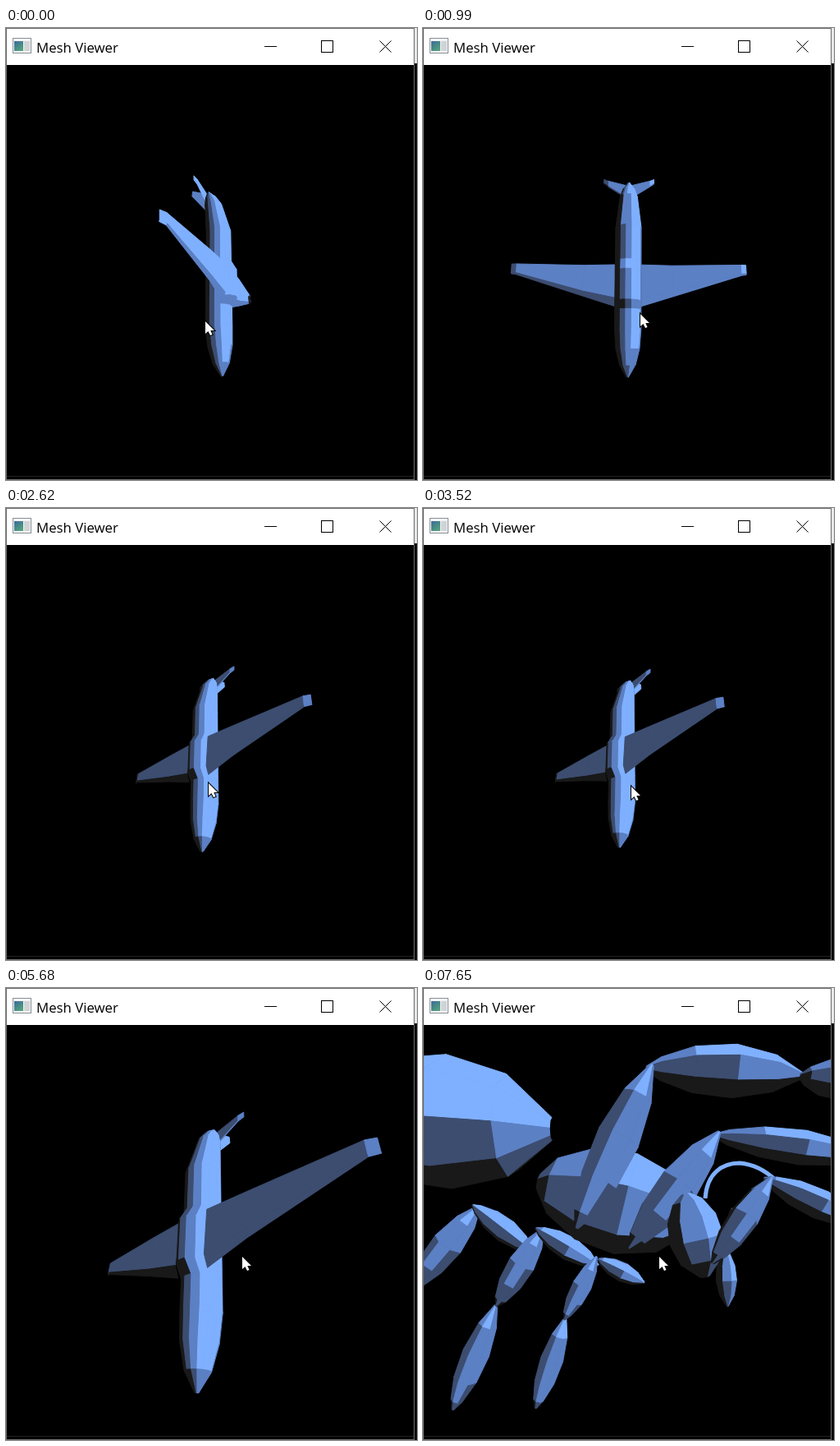
Recreate the animation shown at these times as an HTML page with a canvas. Size 501 px wide and 550 px high, loop 8 s.

```html
<!DOCTYPE html>
<html lang="en">
<head>
<meta charset="utf-8">
<title>Mesh Viewer</title>
<style>
html, body { margin: 0; width: 100%; height: 100%; overflow: hidden; background: #000; }
canvas { display: block; }
</style>
</head>
<body>
<canvas id="stage" width="501" height="550"></canvas>
<script>
const ctx = document.getElementById('stage').getContext('2d');
const LOOP = 8000, ANT_START = 7650, REDRAW = 124.6;
const FOCAL = 433, DISTANCE = 700, CX = 249, CY = 295;
const LIGHT = unit([1, -1, -1]);

// time, nose direction, right wing direction
const POSES = [
  [0, .055, .92, -.38, .367, .277, .888],
  [480, .01, .875, -.48, .975, -.137, -.17],
  [720, 0, .99, -.1, .97, -.1, .2],
  [870, 0, .99, -.12, .97, -.1, .15],
  [1590, -.046, .857, -.513, .725, -.31, -.618]];

// time, extra camera distance
const ZOOM = [[3400, 0], [3520, 35], [3640, 340], [3760, 340], [4440, 1230], [4600, 1365],
  [4870, 1365], [5020, 1020], [5530, 100], [5680, -148], [5830, -365], [5980, -433]];

// time, x, y
const MOUSE = [[0, 243, 357], [480, 254, 355], [1590, 278, 341], [2240, 278, 341], [2480, 250, 335],
  [2620, 247, 335], [3000, 253, 338], [3520, 254, 339], [4010, 254, 339],
  [4160, 254, 361], [4600, 255, 378], [4870, 263, 379], [5170, 288, 327]];

function sample(keys, t) {
  const i = keys.findIndex(k => k[0] > t);
  if (i < 0) return keys[keys.length - 1].slice(1);
  if (i === 0) return keys[0].slice(1);
  const a = keys[i - 1], b = keys[i], u = (t - a[0]) / (b[0] - a[0]);
  return a.slice(1).map((v, j) => v + (b[j + 1] - v) * u);
}

function dot(a, b) { return a[0] * b[0] + a[1] * b[1] + a[2] * b[2]; }
function sub(a, b) { return a.map((v, i) => v - b[i]); }
function unit(a) { return a.map(v => v / Math.hypot(...a)); }
function cross(a, b) {
  return [a[1] * b[2] - a[2] * b[1], a[2] * b[0] - a[0] * b[2], a[0] * b[1] - a[1] * b[0]];
}

// Model coordinates are forward, right, belly.
function lathe(rings, sides) {
  const points = rings.map(([a, r, offset = 0, bulge = 0]) => Array.from({ length: sides }, (_, k) => {
    const angle = k * 2 * Math.PI / sides, s = Math.sin(angle);
    return [a, r * Math.cos(angle), offset + r * s + bulge * Math.max(0, s)];
  }));
  const faces = [];
  for (let i = 1; i < rings.length; i++)
    for (let k = 0; k < sides; k++) {
      const j = (k + 1) % sides;
      faces.push([points[i - 1][k], points[i - 1][j], points[i][j], points[i][k]]);
    }
  return faces;
}

// Sections: span, trailing edge, leading edge, belly height, width of the rounded lip
function surface(sections) {
  const edges = sections.map(([s, trail, lead, n, lip]) =>
    [[trail, s, n], [lead - lip, s, n], [lead, s, n - lip * .45]]);
  return edges.slice(1).flatMap((outer, i) => [0, 1].map(j =>
    [edges[i][j], edges[i][j + 1], outer[j + 1], outer[j]]));
}

function fuselageRing(a) {
  const end = a < 0 ? Math.max(0, -80 - a) / 101 : Math.max(0, a - 115) / 86;
  const radius = 2 + 23 * (1 - end * end) ** .7;
  const offset = 25 - (a < -80 ? 16 * end * end : .065 * (Math.min(a, 115) + 80));
  return [a, radius, offset, a > 0 && a < 70 ? 11 : 0];
}

const mirror = faces => faces.map(f => f.map(([a, s, n]) => [a, -s, n]));
const FUSELAGE = lathe([-181, -165, -147, -80, -14, 6, 62, 78, 115, 150, 180, 201].map(fuselageRing), 14);
const WING = surface([[25, -4, 73, 38, 15], [83, -3, 55, 36, 9], [217, -8, 12, 22, 3], [227, -9, 10, 16, 2]]);
const STABILIZER = surface([[5, -177, -150, 6, 1], [44, -189, -177, 2, 1], [52, -194, -184, -2, 1]]);
const FIN = [[[-180, 0, 2], [-137, 0, 2], [-184, 0, -30], [-196, 0, -28]]];

// place() puts a model point in camera space; closed meshes hide their far side.
function drawFaces(faces, place, closed) {
  for (const face of faces) {
    const p = face.map(place);
    let normal = unit(cross(sub(p[2], p[0]), sub(p[3], p[1])));
    if (dot(normal, p[0]) > 0) {
      if (closed) continue;
      normal = normal.map(v => -v);
    }
    const lit = dot(normal, LIGHT);
    ctx.fillStyle = ctx.strokeStyle =
      lit > .76 ? '#7fb0ff' : lit > .4 ? '#5c80c4' : lit > .05 ? '#3c4d70' : '#191919';
    ctx.beginPath();
    p.forEach(([x, y, z]) => ctx.lineTo(CX + x * FOCAL / z, CY + y * FOCAL / z));
    ctx.closePath();
    ctx.lineWidth = 1;
    ctx.fill();
    ctx.stroke();
  }
}

function placer(forward, right, origin) {
  const belly = cross(forward, right);
  return ([a, s, n]) => origin.map((o, i) => o + a * forward[i] + s * right[i] + n * belly[i]);
}

function drawPlane(t) {
  const pose = sample(POSES, t), side = pose.slice(3);
  const forward = unit(pose.slice(0, 3)), lean = dot(forward, side);
  const right = unit(side.map((v, i) => v - forward[i] * lean));
  const toCamera = placer(forward, right, [0, 0, DISTANCE + sample(ZOOM, t)[0]]);
  const place = ([a, s, n]) => toCamera([a, s + 2, n - 3]);

  const wings = [mirror(WING), WING];
  if (right[2] > 0) wings.reverse();
  [FIN, mirror(STABILIZER), STABILIZER, wings[0]].forEach(part => drawFaces(part, place));
  drawFaces(FUSELAGE, place, true);
  drawFaces(wings[1], place);
}

// A faceted spindle between two stage points
function drawLimb([x1, y1, x2, y2, width], blunt = .7, sides = 7) {
  const dx = x2 - x1, dy = y2 - y1, length = Math.hypot(dx, dy);
  const forward = [dx / length, dy / length, 0], right = [-forward[1], forward[0], 0];
  const rings = [.01, .1, .3, .55, .8, .99].map(u =>
    [u * length, width / 2 * Math.sin(Math.PI * u) ** blunt]);
  drawFaces(lathe(rings, sides), placer(forward, right, [x1 - CX, y1 - CY, FOCAL]), true);
}

// Each limb: both ends and its width, from back to front
const LEFT_LEGS = [[-15, 368, 70, 264, 36], [60, 264, 134, 321, 30], [36, 514, 90, 384, 32],
  [89, 388, 147, 292, 32], [137, 292, 214, 338, 30], [137, 512, 174, 400, 28],
  [172, 404, 212, 326, 24], [213, 330, 270, 359, 24]];
const RIGHT_LEGS = [[270, 98, 466, 107, 62], [458, 107, 570, 118, 50], [186, 294, 280, 92, 54],
  [352, 179, 550, 207, 42], [250, 318, 362, 174, 52]];
const FACE = [[376, 268, 388, 303, 18], [368, 316, 371, 388, 25]];
const FRONT_LEG = [[414, 231, 540, 290, 36], [352, 336, 426, 229, 36]];

function drawAnt() {
  const limbs = list => list.forEach(limb => drawLimb(limb));
  drawLimb([-110, 160, 160, 172, 156], .5, 9);
  limbs(LEFT_LEGS);
  drawLimb([140, 236, 335, 284, 126], .5);
  limbs(RIGHT_LEGS);
  ctx.strokeStyle = '#7fb0ff';
  ctx.lineWidth = 5;
  ctx.stroke(new Path2D('M344 256C346 226 364 213 386 213Q410 215 430 234'));
  limbs(FACE);
  drawLimb([320, 250, 344, 352, 66], .5);
  limbs(FRONT_LEG);
}

function drawWindow() {
  const rect = (color, ...box) => { ctx.fillStyle = color; ctx.fillRect(...box); };
  rect('#000', 0, 0, 501, 550);
  rect('#e6e6e6', 498, 0, 3, 43);
  rect('#0c0c0c', 498, 43, 3, 507);
  rect('#fff', 1, 1, 496, 44);
  rect('#222', 1, 545, 496, 1);
  ctx.strokeStyle = '#6b6b6b';
  ctx.lineWidth = 1;
  ctx.strokeRect(.5, .5, 497, 549);

  rect('#8a8f94', 8, 12, 23, 19);
  rect('#f4f4f4', 9, 13, 21, 17);
  const shade = ctx.createLinearGradient(10, 16, 20, 28);
  shade.addColorStop(0, '#3d6a9c');
  shade.addColorStop(1, '#55a878');
  rect(shade, 10, 16, 11, 12);
  rect('#cfd4d8', 22, 16, 7, 12);

  ctx.fillStyle = '#000';
  ctx.font = '16.8px "Open Sans", "Noto Sans", sans-serif';
  ctx.fillText('Mesh Viewer', 37, 30);
  ctx.strokeStyle = '#000';
  ctx.strokeRect(384.5, 15.5, 14, 14);
  ctx.stroke(new Path2D('M315 22.5H330M455.5 15.5L469.5 29.5M469.5 15.5L455.5 29.5'));
}

function drawMouse(t) {
  const [x, y] = sample(MOUSE, t);
  ctx.save();
  ctx.translate(Math.round(x), Math.round(y));
  const arrow = new Path2D('M0 0V15L3.5 12 6 17 8.5 16 6.3 11H11Z');
  ctx.strokeStyle = '#000';
  ctx.lineWidth = 2;
  ctx.stroke(arrow);
  ctx.fillStyle = '#fff';
  ctx.fill(arrow);
  ctx.restore();
}

function draw(time) {
  const t = Math.floor((time + 60) / REDRAW) * REDRAW;
  drawWindow();
  ctx.save();
  ctx.beginPath();
  ctx.rect(1, 45, 496, 500);
  ctx.clip();
  if (time < ANT_START) drawPlane(t); else drawAnt();
  ctx.restore();
  drawMouse(t);
}

const start = performance.now();
function tick() {
  draw((performance.now() - start) % LOOP);
  requestAnimationFrame(tick);
}
tick();
</script>
</body>
</html>
```
